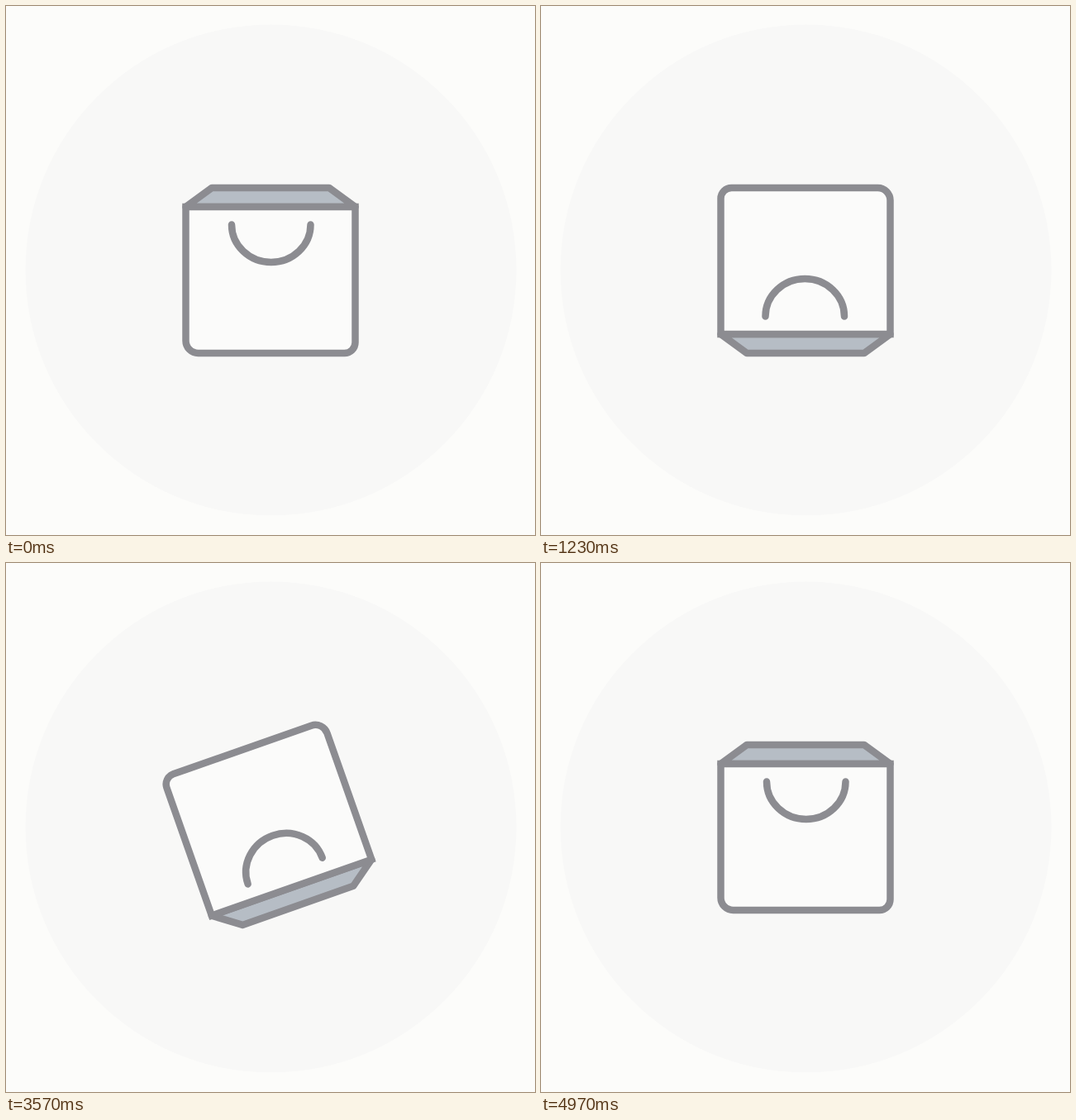
An HTML page that plays this animation: 640 px wide and 640 px high, repeating every 5.01 s.

```html
<!DOCTYPE html>
<html lang="en">
<head>
<meta charset="utf-8">
<title>Bag flip</title>
<style>
  html, body { margin: 0; width: 100%; height: 100%; overflow: hidden; background: #fcfcfa; }
  svg { display: block; width: 100%; height: 100%; }
  .line { stroke: #8c8c91; stroke-width: 8.5; fill: none; }
  .lid { fill: #b6bdc5; }
  .body { fill: #fbfbfa; }
</style>
</head>
<body>
<svg viewBox="0 0 640 640">
  <circle cx="320.5" cy="319.5" r="297" fill="#f8f8f7"/>
  <g id="bag">
    <path class="line lid" stroke-linejoin="round"
      d="M217.5 243 L249 220 H391 L422.5 243 Z"/>
    <path class="line body"
      d="M217.5 243 H422.5 V407 A13 13 0 0 1 409.5 420 H232.5 A15 15 0 0 1 217.5 405 Z"/>
    <path class="line" stroke-linecap="round"
      d="M273 264.5 A47.75 45.5 0 0 0 368.5 264.5"/>
  </g>
</svg>
<script>
  const LOOP = 5010;
  const FRAME = 1000 / 30;
  const FLIP = 1000;         // length of one half turn
  const FLIP_DOWN = 20;      // start times
  const FLIP_UP = 3267;
  const bag = document.getElementById('bag');

  const clamp = v => Math.min(1, Math.max(0, v));
  const ease = p => p < 0.5 ? 4 * p ** 3 : 1 - 4 * (1 - p) ** 3;
  const turn = (t, start) => 180 * ease(clamp((t - start) / FLIP));

  function draw(ms) {
    // Hold each pose for one step at 30 per second
    const t = Math.floor((ms % LOOP + 4) / FRAME) * FRAME;
    const angle = turn(t, FLIP_DOWN) - turn(t, FLIP_UP);
    bag.setAttribute('transform', `rotate(${angle.toFixed(3)} 320 320)`);
  }

  const begin = performance.now();
  function tick() {
    draw(performance.now() - begin);
    requestAnimationFrame(tick);
  }
  tick();
</script>
</body>
</html>
```
